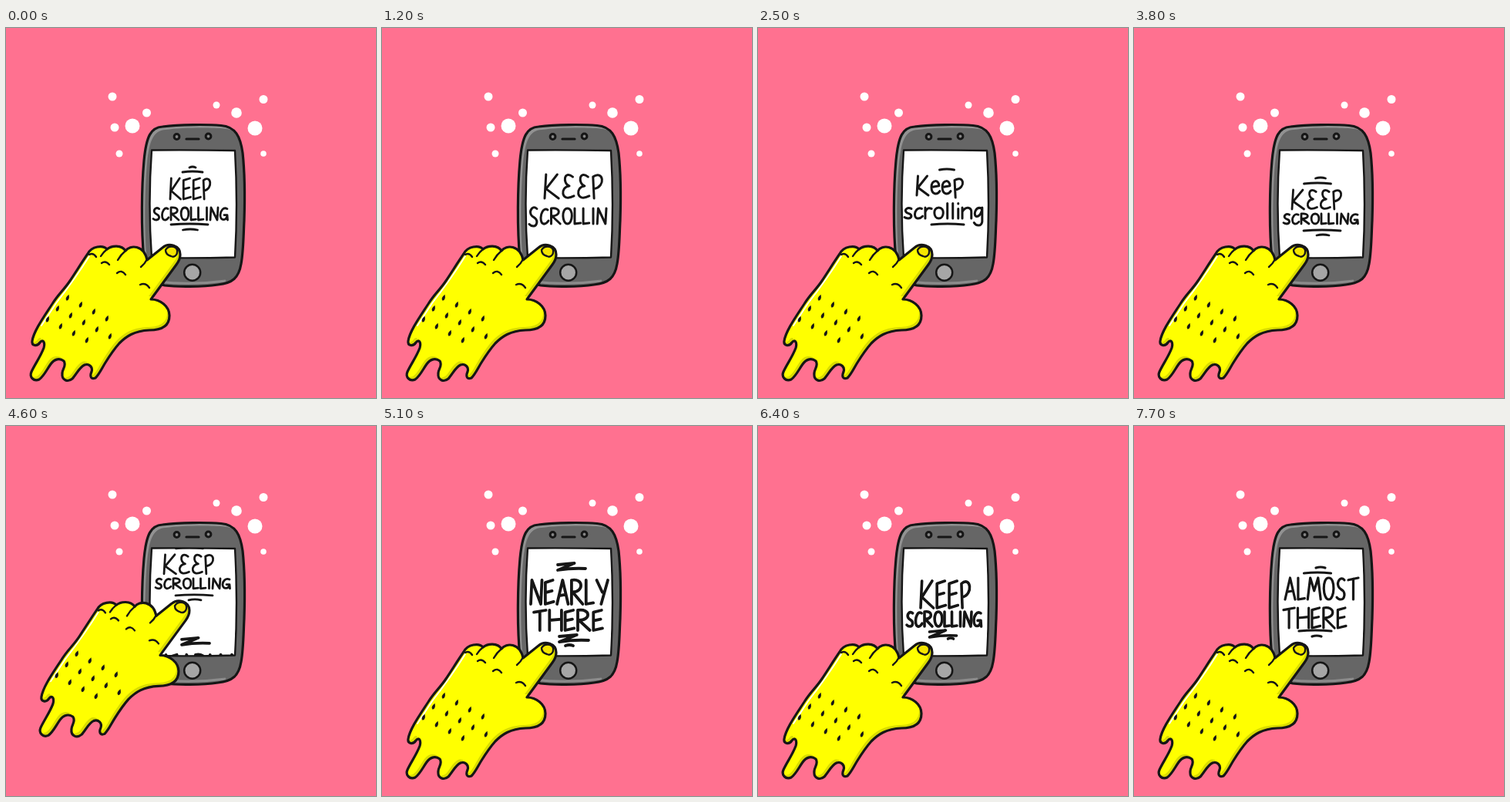
An HTML page that plays this animation: 480 by 480 pixels, repeating every 8 s.

```html
<!DOCTYPE html>
<html lang="en">
<head>
<meta charset="utf-8">
<title>Keep scrolling</title>
<style>
  html, body { margin: 0; width: 100%; height: 100%; overflow: hidden; background: #ff7190; }
  svg { display: block; width: 100vw; height: 100vh; }
  .ink, .edge { fill: none; stroke: #161616; stroke-linecap: round; stroke-linejoin: round; }
  .ink path { vector-effect: non-scaling-stroke; }
  .edge { stroke-width: 3.2; }
  .thin { stroke-width: 2.4; }
</style>
</head>
<body>
<svg viewBox="0 0 480 480" role="img" aria-label="A yellow hand scrolls on a phone">
  <defs>
    <path id="body" d="M203 128C225 125 262 125 279 126.500C298 128 304 141 307 162C310 190 310 220 309 250C308 270 308 290 305 306C302 324 294 331 275 333C255 336 220 336 206 334C188 331 181 318 179 300C175 260 176 205 179 172C182 140 188 129 203 128Z"/>
    <path id="glass" d="M189 158.500Q243 158 297 159Q301 230 297 297.500Q243 299 189 298Q184 228 189 158.500Z"/>
    <path id="skin" d="M106 293C111 283 126 281 131 287C137 282 150 281 155 289C161 281 179 281 183 301L203 285C211 278 226 282 226 294C226 299 224 303 221 307L188 352C200 352 212 361 212 373C212 388 200 392 186 392C166 393 156 400 147 409C139 418 134 426 129 434C124 442 121 449 116 454C111 456 108 453 111 446C113 440 108 435 102 437C95 440 91 450 86 455C80 460 72 457 73 448C73 442 79 438 75 432C70 428 63 429 58 436C53 443 49 452 43 456C36 459 30 453 33 446C37 437 45 426 49 415C51 408 48 403 44 408C40 414 33 412 34 406C36 393 49 375 60 358C68 345 75 340 83 328C91 316 99 303 106 293Z"/>
    <clipPath id="bodyClip"><use href="#body"/></clipPath>
    <clipPath id="glassClip"><use href="#glass"/></clipPath>
    <clipPath id="skinClip"><use href="#skin"/></clipPath>
  </defs>
  <rect width="480" height="480" fill="#ff7190"/>

  <g fill="#fff">
    <circle cx="138" cy="89" r="5.500"/><circle cx="182.500" cy="110" r="5.500"/>
    <circle cx="141" cy="129" r="5.500"/><circle cx="164" cy="127" r="9.500"/>
    <circle cx="147" cy="163" r="4.500"/><circle cx="273" cy="100" r="4.500"/>
    <circle cx="299" cy="110" r="6.800"/><circle cx="334" cy="92.500" r="5.500"/>
    <circle cx="323" cy="130" r="9.500"/><circle cx="334" cy="163" r="3.800"/>
  </g>

  <g id="phone">
    <use href="#body" fill="#929292"/>
    <g clip-path="url(#bodyClip)"><use href="#body" x="4" y="4" fill="#666"/></g>
    <path d="M197 329Q240 334 285 328" fill="none" stroke="#8c8c8c" stroke-width="3"/>
    <use href="#body" class="edge"/>
    <use href="#glass" fill="#fff"/>
    <g clip-path="url(#glassClip)"><g id="reel"></g></g>
    <use href="#glass" class="edge thin"/>
    <path class="edge" d="M234 144H250"/>
    <g fill="#858585" stroke="#161616" stroke-width="3"><circle cx="221.500" cy="141" r="3.400"/><circle cx="262.500" cy="140.500" r="3.400"/></g>
    <circle cx="241.700" cy="317.300" r="10.500" fill="#a6a6a6" stroke="#161616" stroke-width="2.500"/>
  </g>

  <g id="hand">
    <use href="#skin" fill="#d9dc00"/>
    <g clip-path="url(#skinClip)">
      <use href="#skin" x="-3" y="-4" fill="#ff0"/>
      <path d="M108 296Q90 325 65 357L46 386" fill="none" stroke="#fff" stroke-width="1.800" stroke-linecap="round"/>
    </g>
    <use href="#skin" class="edge"/>
    <g class="edge thin">
      <path d="M131 287Q126 291 123 296M155 289Q149 294 145 301M183 300Q180 306 175 310"/>
      <path d="M108 294Q113 291 117 297M124 305Q129 301 134 307M144 318Q150 313 155 320M174 333Q181 330 186 337"/>
      <path d="M207 288C210 282 220 282 222 288C223 295 218 298 214 296C210 295 207 293 207 288Z" fill="#f5e600"/>
    </g>
    <g id="seeds" fill="#161616"></g>
  </g>
</svg>
<script>
const $ = id => document.getElementById(id);

// Pen strokes of each letter in a 10 by 10 box; 3 is the rounded E.
const glyphs = {
  K: 'M1 0L0 10M9 0L1 6L10 10',
  E: 'M9 0L0 1L0 10L10 9M0 5.200L8 4.500',
  3: 'M9 1C1-2 0 4 6 4.800C-2 5-2 12 10 9',
  P: 'M1 10L0 1C10-2 13 5 1 6',
  S: 'M9 1C4-1 0 2 2 4C4 6 9 5 9 8C8 11 2 10 0 9',
  C: 'M9 1C3-1 0 4 0 6C0 11 6 11 10 8',
  R: 'M0 10L0 0C11-1 11 5 1 5L10 10',
  O: 'M5 0C-2 0-1 10 5 10C11 10 12 0 5 0Z',
  L: 'M0 0L0 10L10 9.500',
  I: 'M5 0L5 10',
  N: 'M0 10L1 0L9 10L10 0',
  G: 'M9 1C4-1 0 3 0 6C0 11 8 11 9 6L5 6M9 6L9.500 10',
  A: 'M0 10L5 0L10 10M2 6.500L8 6',
  Y: 'M0 0L5 5M10 0L4 10',
  T: 'M0 1L10 0M5 .5L5 10',
  H: 'M0 0L0 10M10 0L10 10M0 5L10 4.500',
  M: 'M0 10L2 0L5 6L8 0L10 10',
  e: 'M0 5L9 4C9-1 0-1 0 5C0 11 7 11 10 8',
  r: 'M0 0L0 10M0 4C3 0 6 0 10 1',
  n: 'M0 0L0 10M0 4C4-2 10 0 10 4L10 10',
  l: 'M5-4L5 10',
  i: 'M5 1L5 10M5-4L5-3.500',
  g: 'M9 1C2-2-1 6 2 8C6 9 9 4 9 0L9 13C8 18 2 17 0 14'
};

// Letter widths relative to an O.
const widths = { K: 1.1, E: .75, 3: .9, P: .8, S: .85, C: .85, L: .65, I: .3, M: 1.3, r: .7, l: .3, i: .3 };
const gap = .3;
const widthOf = letter => widths[letter] || 1;

// Spreads the letters over the given box.
function word(text, left, right, top, bottom) {
  const letters = [...text];
  const total = letters.reduce((sum, c) => sum + widthOf(c) + gap, -gap);
  const unit = (right - left) / total, height = bottom - top;
  let x = left;
  return letters.map(c => {
    const w = widthOf(c) * unit;
    const path = `<path d="${glyphs[c]}" transform="translate(${x} ${top}) scale(${w / 10} ${height / 10})"/>`;
    x += w + gap * unit;
    return path;
  }).join('');
}

const bar = (x, y, w) => `<path d="M${x - w / 2} ${y}q${w / 2}-2 ${w} 0"/>`;
const zigzag = (x, y, w) =>
  `<path d="M${x - w / 2} ${y}l${w * .6}-2L${x - w / 2} ${y + 7}Q${x} ${y + 4} ${x + w / 2} ${y + 5}"/>`;

const pageHeight = 140;
let pages = 0;
const page = (pen, ...parts) =>
  `<g class="ink" transform="translate(0 ${pageHeight * pages++})" stroke-width="${pen}">${parts.join('')}</g>`;

$('reel').innerHTML = [
  page(2.8, word('KEEP', 213, 266, 195, 222), word('SCROLLING', 191, 288, 233, 249),
    bar(242, 181, 8), bar(242, 187, 26), bar(238, 255, 48), bar(239, 262, 19)),
  page(3, word('K33P', 211, 287, 190, 221), word('S', 191, 202, 232, 257), word('CROLLIN', 206, 291, 234, 254)),
  page(3, word('K', 206, 221, 192, 217), word('ee', 225, 250, 198, 215), word('P', 255, 267, 195, 220),
    word('SCrOlling', 190, 292, 233, 247), bar(245, 184, 19), bar(246, 255, 42)),
  page(2.8, word('K33P', 205, 270, 210, 235), word('SCROLLING', 194, 291, 241, 254),
    bar(242, 195, 13), bar(238, 202, 35), bar(244, 263, 48), bar(245, 269, 16)),
  page(3.8, word('NEARLY', 193, 293, 200, 231), word('THERE', 197, 286, 239, 265),
    zigzag(246, 180, 36), zigzag(249, 273, 38), bar(243, 285, 10)),
  page(3.6, word('KEEP', 211, 276, 201, 236), word('SCROLLING', 193, 290, 241, 260),
    zigzag(240, 267, 35), bar(250, 276, 7)),
  page(3.2, word('ALMOST', 196, 291, 197, 225), word('THERE', 194, 275, 236, 262),
    bar(242, 184, 12), bar(238, 191, 35), bar(235, 266, 42), bar(237, 273, 12))
].join('');

// Seeds lie on a slanted lattice, with one more in the middle row.
for (let row = 0; row < 3; row++) {
  for (let col = 0; col < 4 + row % 2; col++) {
    const x = 80 - 13 * row + 17 * col, y = 350 + 14 * row + 9 * col;
    $('seeds').innerHTML += `<path transform="translate(${x} ${y}) rotate(20)" d="M0-4.500Q4 2 0 4Q-4 2 0-4.500Z"/>`;
  }
}

const loop = 8000, firstSwipe = 500, period = 1300, poseTime = 100, poses = 8;
const ease = u => (1 - Math.cos(Math.PI * u)) / 2;

// Each swipe moves in poses: the hand goes up and back while the page scrolls by.
function draw(now) {
  const t = now % loop - firstSwipe;
  const swipe = Math.floor(t / period);
  const pose = Math.floor((t - swipe * period) / poseTime) + 1;
  const u = Math.min(1, pose / poses);
  const lift = ease(2 * u);
  $('hand').setAttribute('transform', `translate(${14 * lift} ${-64 * lift})`);
  $('reel').setAttribute('transform', `translate(0 ${-pageHeight * (swipe + ease(u))})`);
}

const start = performance.now();
function tick() {
  draw(performance.now() - start);
  requestAnimationFrame(tick);
}
tick();
</script>
</body>
</html>
```
